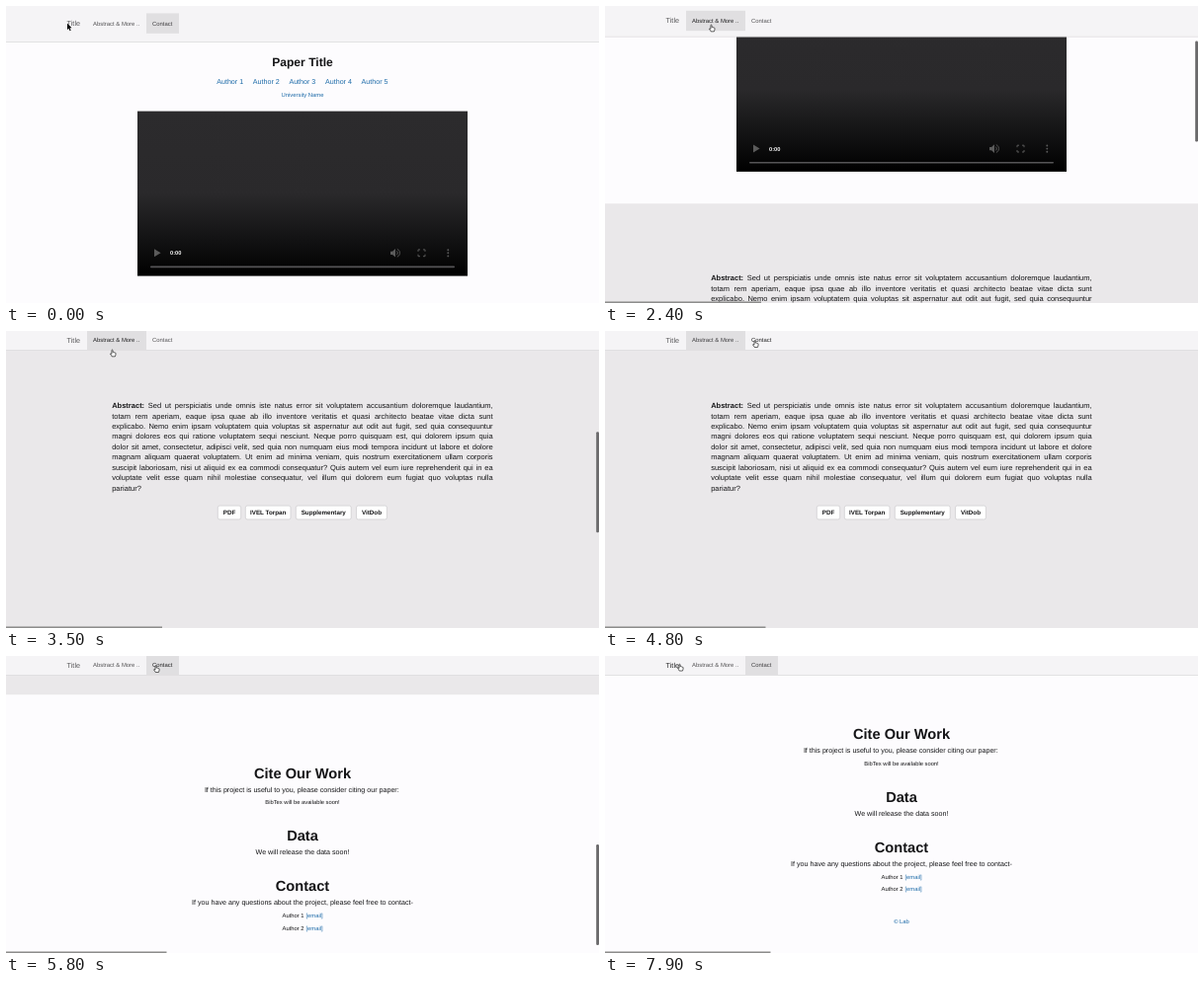
An HTML page with a canvas that plays this animation: 600 px wide and 301 px high, repeating every 8 s.

```html
<!DOCTYPE html>
<html lang="en">
<head>
<meta charset="utf-8">
<title>Project page walkthrough</title>
<style>
  html, body { margin: 0; width: 100%; height: 100%; overflow: hidden; background: #fdfcfe; }
  canvas { display: block; width: 600px; height: 301px; }
</style>
</head>
<body>
<canvas id="stage" width="600" height="301"></canvas>
<script>
const ctx = document.getElementById('stage').getContext('2d');
const W = 600, H = 301, LOOP = 8000;
// Three sections, each one viewport high; the viewport reaches just below the stage.
const SECTION = 306;
const SCROLLS = [1691, 4905], SCROLL_TIME = 1500;
const INK = '#151517', LINK = '#1c6aa8';
const FAMILY = '"Liberation Sans", Arial, sans-serif';

const clamp = v => Math.min(1, Math.max(0, v));
const mix = (a, b, k) => a + (b - a) * k;
const smooth = k => k * k * (3 - 2 * k);
const span = (t, from, to) => clamp((t - from) / (to - from));

function easeInOutExpo(k) {
  if (k <= 0) return 0;
  if (k >= 1) return 1;
  return k < 0.5 ? 2 ** (20 * k - 11) : 1 - 2 ** (9 - 20 * k);
}

function rect(x, y, w, h, color) {
  ctx.fillStyle = color;
  ctx.fillRect(x, y, w, h);
}

function roundBox(x, y, w, h, r, fill, stroke) {
  ctx.beginPath();
  ctx.roundRect(x, y, w, h, r);
  ctx.fillStyle = fill;
  ctx.fill();
  if (stroke) {
    ctx.strokeStyle = stroke;
    ctx.lineWidth = 0.7;
    ctx.stroke();
  }
}

function setFont(size, bold) {
  ctx.font = `${bold ? 'bold ' : ''}${size}px ${FAMILY}`;
  ctx.textRendering = 'geometricPrecision';
}

// y is the middle of the capital letters
function text(str, x, y, size, { color = INK, bold = false, align = 'center' } = {}) {
  setFont(size, bold);
  ctx.textAlign = align;
  ctx.fillStyle = color;
  ctx.fillText(str, x, y + size * 0.36);
}

const ABSTRACT = [
  'Abstract: Sed ut perspiciatis unde omnis iste natus error sit voluptatem accusantium doloremque laudantium,',
  'totam rem aperiam, eaque ipsa quae ab illo inventore veritatis et quasi architecto beatae vitae dicta sunt',
  'explicabo. Nemo enim ipsam voluptatem quia voluptas sit aspernatur aut odit aut fugit, sed quia consequuntur',
  'magni dolores eos qui ratione voluptatem sequi nesciunt. Neque porro quisquam est, qui dolorem ipsum quia',
  'dolor sit amet, consectetur, adipisci velit, sed quia non numquam eius modi tempora incidunt ut labore et dolore',
  'magnam aliquam quaerat voluptatem. Ut enim ad minima veniam, quis nostrum exercitationem ullam corporis',
  'suscipit laboriosam, nisi ut aliquid ex ea commodi consequatur? Quis autem vel eum iure reprehenderit qui in ea',
  'voluptate velit esse quam nihil molestiae consequatur, vel illum qui dolorem eum fugiat quo voluptas nulla',
  'pariatur?'
];

function justified(line, x, y, width, size) {
  const words = line.split(' ').map(word => {
    const bold = word === 'Abstract:';
    setFont(size, bold);
    return { word, bold, w: ctx.measureText(word).width };
  });
  const used = words.reduce((sum, item) => sum + item.w, 0);
  const gap = words.length > 1 ? (width - used) / (words.length - 1) : 0;
  for (const { word, bold, w } of words) {
    text(word, x, y, size, { bold, align: 'left' });
    x += w + gap;
  }
}

function drawVideo() {
  const shade = ctx.createLinearGradient(0, 107, 0, 273.5);
  shade.addColorStop(0, '#2c2b2d');
  shade.addColorStop(0.5, '#2a292b');
  shade.addColorStop(0.78, '#121213');
  shade.addColorStop(1, '#000');
  rect(133, 106.6, 334, 167, shade);

  const grey = '#5b5b5b';
  ctx.fillStyle = ctx.strokeStyle = grey;
  ctx.beginPath();
  ctx.moveTo(150, 246.3);
  ctx.lineTo(156.6, 250.3);
  ctx.lineTo(150, 254.3);
  ctx.fill();
  text('0:00', 166, 250.2, 5.7, { color: '#f2f2f2', bold: true, align: 'left' });

  ctx.fillStyle = grey;
  ctx.beginPath();
  ctx.moveTo(389, 248.7);
  ctx.lineTo(391, 248.7);
  ctx.lineTo(394, 246);
  ctx.lineTo(394, 254.6);
  ctx.lineTo(391, 252);
  ctx.lineTo(389, 252);
  ctx.fill();
  ctx.lineWidth = 0.9;
  for (const r of [2, 4.2]) {
    ctx.beginPath();
    ctx.arc(394.3, 250.3, r, -1.2, 1.2);
    ctx.stroke();
  }

  ctx.lineWidth = 1;
  for (const sx of [-1, 1]) for (const sy of [-1, 1]) {
    ctx.beginPath();
    ctx.moveTo(420.5 + sx * 1.5, 250.3 + sy * 3.4);
    ctx.lineTo(420.5 + sx * 3.5, 250.3 + sy * 3.4);
    ctx.lineTo(420.5 + sx * 3.5, 250.3 + sy * 1.4);
    ctx.stroke();
  }
  for (const dy of [-3.1, 0, 3.1]) {
    ctx.beginPath();
    ctx.arc(447.3, 250.3 + dy, 0.95, 0, 7);
    ctx.fill();
  }
  roundBox(146, 263.6, 308, 1.7, 0.8, '#555456');
}

function drawIntro() {
  text('Paper Title', 300, 57, 12.1, { bold: true });
  for (let i = 0; i < 5; i++) {
    text(`Author ${i + 1}`, 213.2 + i * 36.6, 76.5, 7.13, { color: LINK, align: 'left' });
  }
  text('University Name', 300, 90, 5.85, { color: LINK });
  drawVideo();
}

function drawAbstract() {
  rect(0, 0, W, SECTION - 0.5, '#eae8ea');
  ABSTRACT.forEach((line, i) => justified(line, 107.2, 75.5 + i * 10.43, 385.4, 7.5));
  const buttons = [['PDF', 214, 24], ['IVEL Torpan', 242, 46.3], ['Supplementary', 293, 56.5], ['VitDob', 354.2, 31.5]];
  for (const [label, x, w] of buttons) {
    roundBox(x + 0.3, 177.1, w - 0.6, 13.8, 1.8, '#fff', '#cccbcd');
    text(label, x + w / 2, 184, 6.25, { bold: true });
  }
}

function drawContact() {
  for (const [label, y] of [['Cite Our Work', 79], ['Data', 142.5], ['Contact', 193.5]]) {
    text(label, 300, y, 14.65, { bold: true });
  }
  text('If this project is useful to you, please consider citing our paper:', 299.3, 95.5, 7.13);
  text('BibTex will be available soon!', 300, 108.5, 5.8);
  text('We will release the data soon!', 300, 159, 7.13);
  text('If you have any questions about the project, please feel free to contact-', 300, 210, 7.13);
  for (const n of [1, 2]) {
    const y = 210.8 + n * 12.6;
    text(`Author ${n}`, 279.5, y, 5.85, { align: 'left' });
    text('[email]', 320.6, y, 5.85, { color: LINK, align: 'right' });
  }
  text('© Lab', 300, 269, 5.85, { color: LINK });
}

function drawNav(t, cursor) {
  const pad = 8.4 * (1 - smooth(span(t, 2215, 2715)));
  const height = 19.4 + 2 * pad;
  rect(0, 0, W, height, '#f5f4f6');
  rect(0, height - 0.2, W, 0.8, '#dddcde');

  const active = t >= 1600 && t < 4900 ? 'Abstract & More ..' : 'Contact';
  const items = [['Abstract & More ..', 82, 60, 88], ['Contact', 142, 33, 148]];
  const y = 9.1 + pad;
  const over = (x, w) => cursor.hand && cursor.x >= x && cursor.x < x + w;
  text('Title', 61.6, y, 7.25, { color: over(55, 27) ? '#2a2a2b' : '#5c5b5d', align: 'left' });
  for (const [label, x, w, textX] of items) {
    if (label === active) rect(x, Math.max(0, pad - 1), w, pad > 1 ? 20.4 : 19.4 + pad, '#e0dfe1');
    const color = over(x, w) ? '#222223' : label === active ? '#3f3e40' : '#555456';
    text(label, textX, y, 5.92, { color, align: 'left' });
  }
}

function cursorAt(t) {
  const stops = [[100, 400, 62, 17.6], [4400, 4700, 107.5, 19], [7500, 7800, 151.6, 9.6], [0, 0, 75.6, 8.2]];
  let x = stops[0][2], y = stops[0][3];
  for (let i = 0; i < 3; i++) {
    const k = smooth(span(t, stops[i][0], stops[i][1]));
    x = mix(x, stops[i + 1][2], k);
    y = mix(y, stops[i + 1][3], k);
  }
  return { x, y, hand: t >= 1300 };
}

const ARROW = new Path2D('M0 0V6.4L1.5 5.1L2.6 7.6L3.7 7.1L2.6 4.7H4.6Z');
const HAND = new Path2D('M-.6.5Q0-.4.6.5V2.8Q1.3 2.3 1.8 3Q2.6 2.6 2.9 3.3Q3.9 3.1 3.9 4.2Q4 5.8 3.2 7.6H-.4Q-1.1 6-2.3 4.7Q-2.1 3.7-.6 4.7Z');

function drawCursor({ x, y, hand }) {
  ctx.save();
  ctx.translate(x, y);
  ctx.lineJoin = 'round';
  ctx.lineWidth = 0.8;
  ctx.strokeStyle = hand ? '#222' : '#fff';
  ctx.fillStyle = hand ? '#fff' : '#000';
  if (hand) {
    ctx.scale(0.9, 0.9);
    ctx.fill(HAND);
    ctx.stroke(HAND);
  } else {
    ctx.stroke(ARROW);
    ctx.fill(ARROW);
  }
  ctx.restore();
}

function drawScrollbar(t, scroll) {
  const shown = SCROLLS.reduce((a, start) => {
    const since = t - start;
    return since < 0 ? a : 1 - span(since, SCROLL_TIME + 580, SCROLL_TIME + 730);
  }, 0);
  if (!shown) return;
  ctx.globalAlpha = shown;
  roundBox(597.2, scroll / 3 + 0.3, 2.8, SECTION / 3, 1.2, '#6a696b');
  ctx.globalAlpha = 1;
}

function drawStatus(t) {
  if (t < 1600) return;
  const width = t < 4600 ? 158 : t < 7800 ? 162.5 : 167.5;
  rect(0, 299.5, width, 1.5, '#8b8b8a');
}

function draw(t) {
  const scroll = SCROLLS.reduce((sum, start) => sum + SECTION * easeInOutExpo((t - start) / SCROLL_TIME), 0);
  const cursor = cursorAt(t);
  rect(0, 0, W, H, '#fdfcfe');
  ctx.save();
  ctx.translate(0, -scroll);
  for (const drawSection of [drawIntro, drawAbstract, drawContact]) {
    drawSection();
    ctx.translate(0, SECTION);
  }
  ctx.restore();
  drawNav(t, cursor);
  drawScrollbar(t, scroll);
  drawStatus(t);
  drawCursor(cursor);
}

const began = performance.now();
function tick() {
  draw((performance.now() - began) % LOOP);
  requestAnimationFrame(tick);
}
tick();
</script>
</body>
</html>
```
